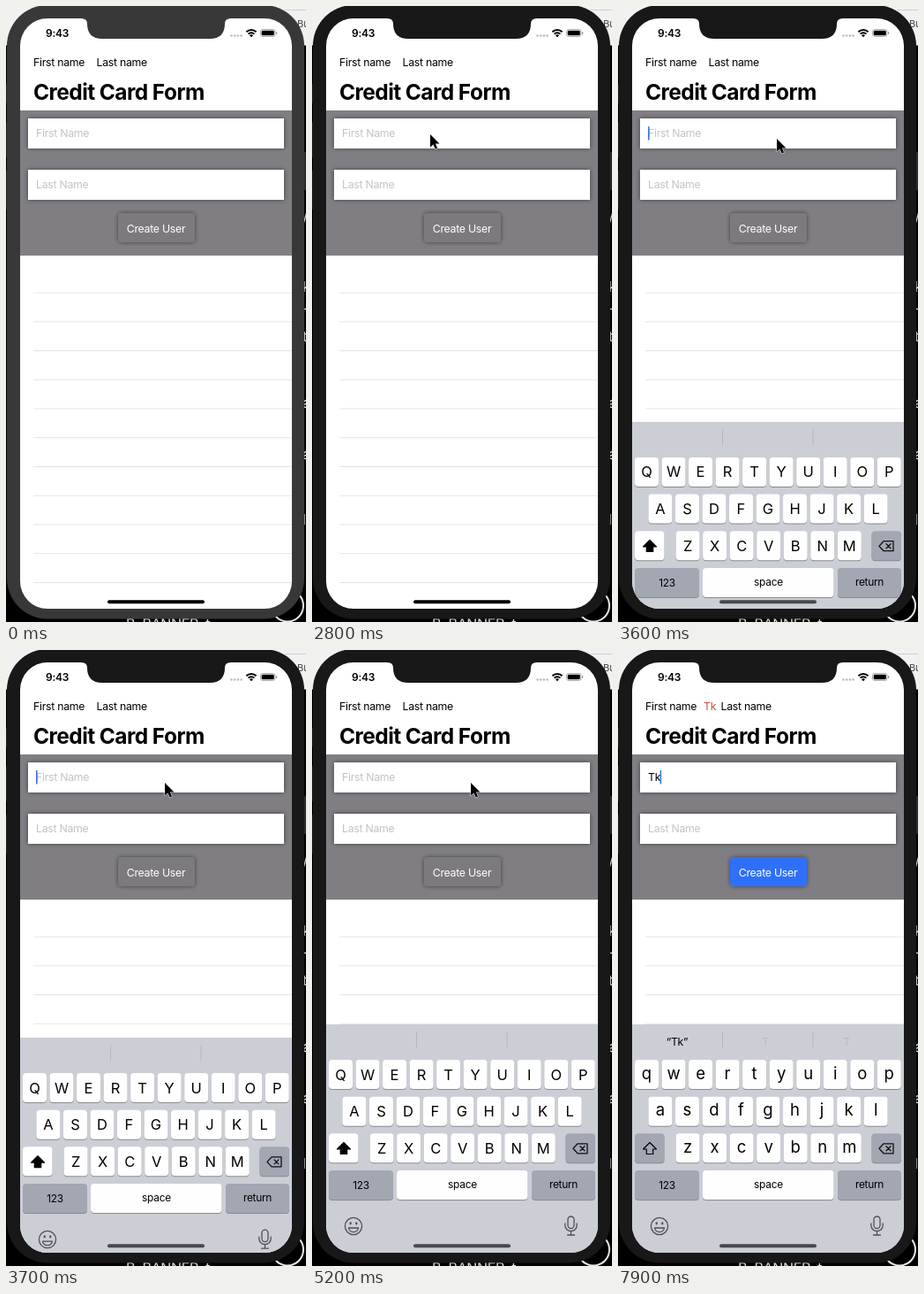
An HTML page that plays this animation: 340x696 px, repeating every 8000 ms.

```html
<!DOCTYPE html>
<html lang="en">
<head>
<meta charset="utf-8">
<title>Credit Card Form</title>
<style>
  html, body { margin: 0; width: 100%; height: 100%; overflow: hidden; background: #000; }
  svg { display: block; }
  text { font: 12.3px Inter, "Liberation Sans", sans-serif; letter-spacing: -.022em; white-space: pre; }
  .mid { text-anchor: middle; }
  .hint { fill: #c3c3c6; }
  .title { font-size: 24.5px; font-weight: 700; letter-spacing: -.024em; }
  .clock { font-size: 12px; font-weight: 600; }
  .edge { fill: #ddd; font-size: 16px; }
  .cap { font-size: 16.5px; letter-spacing: 0; }
  .cap.low { font-size: 18.5px; }
  .small { font-size: 11.9px; }
  .line { fill: none; stroke: #4d5056; stroke-width: 1.3; stroke-linecap: round; stroke-linejoin: round; }
</style>
</head>
<body>
<svg id="stage" width="340" height="696" viewBox="0 0 340 696"></svg>
<script>
const LOOP = 8000, STEP = 100;
const stage = document.getElementById('stage');
const rows = ['QWERTYUIOP', 'ASDFGHJKL', 'ZXCVBNM'];
const rowX = [19, 34.4, 65.6], rowY = [463, 504.7, 546.3, 588], pitch = 30.53;

const rect = (x, y, w, h, fill, rx = 0, extra = '') =>
  `<rect x="${x}" y="${y}" width="${w}" height="${h}" rx="${rx}" fill="${fill}" ${extra}/>`;
const text = (x, y, s, cls = '', extra = '') =>
  `<text x="${x}" y="${y}" class="${cls}" ${extra}>${s}</text>`;
const key = (x, y, w, fill, id = '') =>
  rect(x, y + 1, w, 33, '#888b91', 4) + rect(x, y, w, 33, fill, 4, id && `id="${id}"`);

function letterKeys() {
  return rows.map((row, r) => [...row].map((c, i) => {
    const x = rowX[r] + i * pitch;
    return key(x, rowY[r], 27, '#fefefe') +
      text(x + 13.5, rowY[r] + 22.5, c, 'cap mid', `data-y="${rowY[r]}"`);
  }).join('')).join('');
}

function backdrop() {
  const scraps = [[245, '/'], [323, 'k'], [347, '-'], [379, 't'], [454, 'a'], [512, 'a'], [586, 'l']];
  return rect(0, 0, 340, 696, '#000') + rect(0, 0, 340, 44.5, '#f1f1f1') +
    rect(316, 4, 24, 1, '#cfcfcf') + text(330, 24, 'Bu', '', 'fill="#444" style="font-size:11px"') +
    scraps.map(([y, c]) => text(336, y, c, 'edge')).join('') +
    text(136, 703.5, 'B. BANNER  t', 'edge') +
    '<circle cx="319" cy="677.5" r="18" fill="#000" stroke="#e8e8e8" stroke-width="2"/>' +
    [[88, 22], [131, 40], [186, 44]].map(([y, h]) => rect(0, y, 3, h, '#242424', 1)).join('') +
    rect(336, 165, 4, 43, '#2c2c2c', 1);
}

function statusBar() {
  const dots = [255.5, 259.2, 262.9, 266.6].map(x => `<circle cx="${x}" cy="33.5" r="1.3" fill="#bbb"/>`).join('');
  return text(45, 35, '9:43', 'clock') + dots +
    `<g fill="none" stroke="#000" stroke-width="1.9">
      <path d="M272.4 29.3A8 8 0 0 1 283.6 29.3M274.6 31.6A4.8 4.8 0 0 1 281.4 31.6"/></g>
    <path d="M278 35.3L276 33.2A2.9 2.9 0 0 1 280 33.2Z"/>` +
    rect(288.5, 26.5, 16.5, 8, 'none', 2.3, 'stroke="#999" stroke-width=".8"') +
    rect(289.7, 27.7, 14.1, 5.6, '#000', 1.3) + rect(306, 29, 1.2, 3, '#999', .6);
}

function form() {
  const field = y => rect(25, y, 290, 34, '#fff', 0, 'filter="url(#shade)"');
  const rules = Array.from({ length: 11 }, (_, i) => rect(31, 323.6 + i * 32.74, 293, .9, '#e2e2e4')).join('');
  return text(31, 68, 'First name') + text(97, 68, 'Tk', '', 'id="echo" fill="#c9503c"') +
    text(102.5, 68, 'Last name', '', 'id="last"') +
    text(31, 106, 'Credit Card Form', 'title') +
    rect(16, 118, 308, 164, '#807e83') + field(127) + field(185) +
    text(34, 148.3, 'First Name', 'hint', 'id="first"') + text(34, 206.3, 'Last Name', 'hint') +
    rect(34, 136, 1.6, 15.5, '#3c73ee', .6, 'id="caret"') +
    rect(127, 234, 87, 33, '#7c7a7f', 4, 'filter="url(#shade)"') +
    rect(127, 234, 87, 33, '#2f70fb', 4, 'id="blue"') +
    text(170, 255.5, 'Create User', 'mid', 'fill="#fff"') + rules;
}

function keyboard() {
  const grey = '#a2a7b2';
  return `<g id="keyboard">` + rect(16, 423, 308, 273, '#cbced5') +
    rect(118, 431, 1, 18, '#b4b7be') + rect(220.5, 431, 1, 18, '#b4b7be') +
    text(67, 446.5, '“Tk”', 'mid', 'id="guess"') +
    `<g id="more" fill="#777">${text(167, 446.5, 'T', 'mid')}${text(259, 446.5, 'T', 'mid')}</g>` +
    letterKeys() + key(19, rowY[2], 33.5, '#fff', 'shiftKey') + key(287.5, rowY[2], 33.5, grey) +
    key(19, rowY[3], 73, grey) + key(96, rowY[3], 148.5, '#fefefe') + key(249, rowY[3], 72, grey) +
    text(55.5, 609, '123', 'small mid') + text(170.5, 608, 'space', 'small mid') +
    text(285, 608, 'return', 'small mid') +
    `<path id="shift" d="M36 556.5L28.5 564H32.3V569.5H39.7V564H43.5Z" stroke="#000" stroke-width="1.2" stroke-linejoin="round"/>
    <path class="line" style="stroke:#111" d="M296 563.3L301 557.8H312V568.8H301ZM304 560.8l5 5m0-5l-5 5"/>
    <g class="line"><circle cx="47" cy="651" r="9.6"/>
      <path d="M41.5 653a5.6 5.6 0 0 0 11 0Z"/>
      <path stroke-width="2.2" d="M43.7 647.3v1M50.3 647.3v1"/>
      <rect x="290" y="640" width="7" height="13.5" rx="3.5"/>
      <path d="M286.8 648v2a6.7 6.7 0 0 0 13.4 0v-2M293.5 656.7V661M289.5 661h8"/></g></g>`;
}

stage.innerHTML = `<defs>
    <clipPath id="screen"><rect x="16" y="14" width="308" height="667" rx="31"/></clipPath>
    <filter id="shade" x="-10%" y="-30%" width="120%" height="160%">
      <feDropShadow dx="0" dy="0" stdDeviation="2.4" flood-color="#000" flood-opacity=".5"/></filter>
  </defs>` + backdrop() +
  rect(1, -1, 337, 693.5, '#383838', 46, 'id="body"') +
  `<g clip-path="url(#screen)">` + rect(16, 14, 308, 667, '#fff') + statusBar() + form() + keyboard() +
  rect(115, 671.3, 110, 4, '#000', 2, 'id="home"') + `</g>
  <path id="notch" d="M85 13V14Q92 14 92 20Q92 37 109 37H231Q248 37 248 20Q248 14 255 14V13Z"/>
  <path id="pointer" d="M0 0V14.5L3.4 11.4 5.7 16.6 8.1 15.5 5.9 10.5H10.5Z" stroke="#fff" stroke-width="1" paint-order="stroke"/>`;

const el = {};
stage.querySelectorAll('[id]').forEach(n => el[n.id] = n);
const caps = [...stage.querySelectorAll('.cap')];
const set = (name, attrs) => { for (const k in attrs) el[name].setAttribute(k, attrs[k]); };
const clamp = v => Math.max(0, Math.min(1, v));
const ramp = (t, a, b) => clamp((t - a) / (b - a));

// Pointer stops: time, x, y
const path = [[2400, 203, 110], [2500, 187, 118], [2600, 158, 134], [2700, 140, 143], [2800, 134, 145],
  [3000, 132, 146], [3100, 132, 146], [3200, 145, 148], [3300, 157, 150], [3400, 157, 150],
  [3500, 174, 150], [3600, 180, 150]];

function pointerAt(t) {
  const i = path.findIndex(p => p[0] > t);
  if (i < 0) return path.at(-1).slice(1);
  const a = path[Math.max(0, i - 1)], b = path[i], k = ramp(t, a[0], b[0]);
  return [a[1] + (b[1] - a[1]) * k, a[2] + (b[2] - a[2]) * k];
}

function caretAlpha(t) {
  if (t < 3500) return 0;
  if (t < 4000 || t >= 6000) return 1;
  const p = t % 1000;
  return p < 400 ? 1 - ramp(p, -50, 200) : ramp(p, 350, 600);
}

function draw(t) {
  const typed = t < 6000 ? '' : t < 7400 ? 'T' : 'Tk';
  const lower = t >= 6100, shown = t >= 3500, done = typed === 'Tk';
  const shell = t < 2700 ? '#383838' : '#181818';
  set('body', { fill: shell });
  set('notch', { fill: shell });

  const [x, y] = pointerAt(t);
  set('pointer', { transform: `translate(${x} ${y})`, opacity: +(t >= 2400 && t < 6000) });

  el.first.textContent = typed || 'First Name';
  set('first', { class: typed ? '' : 'hint' });
  set('caret', { x: 34 + typed.length * 6.8, opacity: caretAlpha(t), fill: typed ? '#2f7fd0' : '#3c73ee' });
  set('echo', { opacity: +done });
  set('last', { x: done ? 116.5 : 102.5 });
  set('blue', { opacity: ramp(t, 7300, 7700) });

  const drop = !shown ? 273 : t >= 3900 ? 0 : 258 * Math.exp(-(t - 3450) / 88);
  set('keyboard', { transform: `translate(0 ${drop})` });
  set('home', { fill: shown ? '#46484c' : '#000' });
  set('guess', { opacity: ramp(t, 7400, 7700) });
  set('more', { opacity: .2 * ramp(t, 7700, 7900) });

  set('shiftKey', { fill: lower ? '#a2a7b2' : '#fff' });
  set('shift', { fill: lower ? 'none' : '#000' });
  for (const c of caps) {
    c.textContent = lower ? c.textContent.toLowerCase() : c.textContent.toUpperCase();
    c.classList.toggle('low', lower);
    c.setAttribute('y', +c.dataset.y + (lower ? 21.7 : 22.5));
  }
}

const start = performance.now();
let last = -1;
function tick() {
  const t = Math.floor((performance.now() - start) % LOOP / STEP) * STEP;
  if (t !== last) draw(last = t);
  requestAnimationFrame(tick);
}
tick();
</script>
</body>
</html>
```
